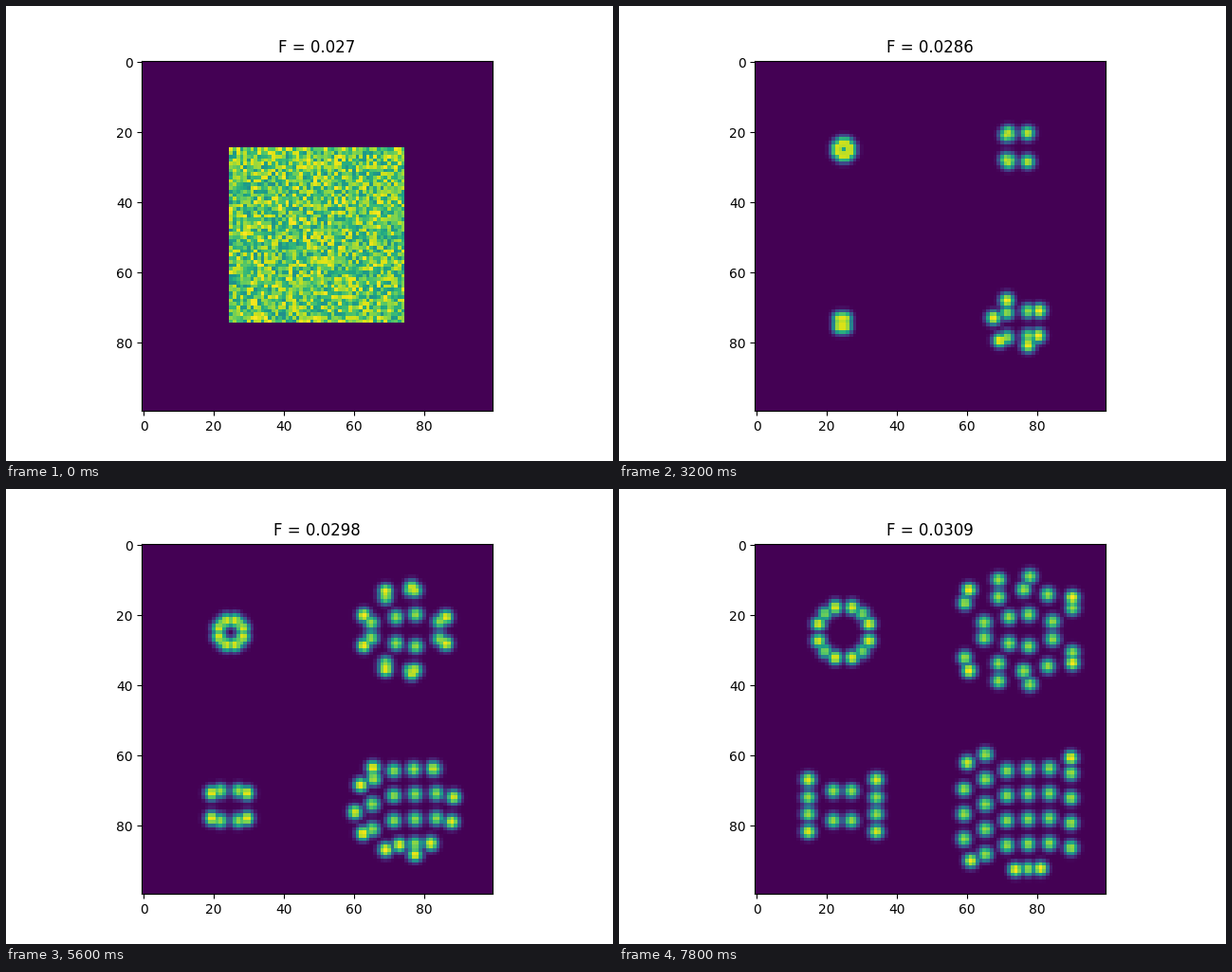
Recreate the animation shown at these times as a matplotlib script. Size 640 by 480 pixels, loop 8 s.

```python
import numpy as np
import matplotlib.pyplot as plt
from matplotlib.animation import FuncAnimation

SIZE = 100
FRAMES = 40
rows, cols = np.mgrid[0:SIZE, 0:SIZE]


def mirror(points, sx=(1,), sy=(1,)):
    return [(a * x, b * y) for x, y in points for a in sx for b in sy]


class Colony:
    """Spots that divide outward from a centre, each one leaving its
    nearest inner neighbour when the growth front gets there."""

    def __init__(self, centre, sites, start, speed):
        self.centre, self.start, self.speed = np.array(centre), start, speed
        sites = np.array([(0, 0)] + sites, float)
        radius = np.hypot(*sites.T)
        order = radius.argsort(kind="stable")
        self.sites, self.radius = sites[order], radius[order]
        self.parent = [self.find_parent(n) for n in range(1, len(sites))]

    def find_parent(self, n):
        gap = np.hypot(*(self.sites - self.sites[n]).T)
        gap[self.radius > self.radius[n] - 1e-6] = np.inf
        return gap.argmin()

    def spots(self, i):
        front = max(1.3, self.speed * (i - self.start))
        places = [np.zeros(2)]
        for n, m in enumerate(self.parent, 1):
            span = max(self.radius[n] - self.radius[m], 4)
            p = np.clip((front - self.radius[m]) / span, 0, 1)
            place = places[m] + p * (self.sites[n] - places[m])
            places.append(place)
            # spots on the move glow a little brighter
            yield *(self.centre + place), 0.85 + 0.15 * np.sin(np.pi * p)


class Ring:
    """A round spot that opens into a ring of four arcs."""

    def __init__(self, centre, start, speed):
        self.centre, self.start, self.speed = centre, start, speed

    def spots(self, i):
        r = max(1.7, self.speed * (i - self.start))
        for corner in range(45, 360, 90):
            for turn in (-26.5, 0, 26.5):
                a = np.radians(corner + turn)
                glow = 0.95 if turn else 0.8
                yield (self.centre[0] + r * np.cos(a),
                       self.centre[1] + r * np.sin(a), glow)


BOTH = (1, -1)
NE = [(-2.4, 3.7), (3.2, 4.5), (-9.5, 2.2), (10, 2.5), (-5.4, 9.5),
      (1.8, 11.6), (8.7, 10.2), (-15, 7.8), (15.7, 6.4), (-12.9, 14.2),
      (-5.4, 14.4), (3.5, 15.4), (15.7, 11.6)]
SW = [(2.6, 4.2), (9.7, 2.4), (9.7, 8.9)]
# staggered columns, given by the height of their top spot
TOPS = (-11.8, -14.6, -10, -10.4, -10.6, -16.4)
SE = [(6.1 * (c - 2.5), top + 7.1 * j)
      for c, top in enumerate(TOPS) for j in range(5)]

COLONIES = [
    Ring((24.9, 25), 18, 0.36),
    Colony((74.4, 24.4), mirror(NE, sy=BOTH), 8, 0.62),
    Colony((24.5, 74.4), mirror(SW, BOTH, BOTH), 16.5, 0.58),
    Colony((74.4, 74.4), SE, 3.5, 0.58),
]


def field(i):
    grid = np.zeros((SIZE, SIZE))
    if i == 0:
        grid[25:75, 25:75] = np.random.default_rng(4).uniform(0.5, 1, (50, 50))
        return grid
    for colony in COLONIES:
        for x, y, glow in colony.spots(i):
            dist = np.hypot(cols - x, rows - y)
            grid = np.maximum(grid, glow * np.exp(-(dist / 2.1) ** 2.6))
    return grid / grid.max()


fig, ax = plt.subplots(figsize=(6.4, 4.8), dpi=100)
image = ax.imshow(field(0), cmap="viridis", vmin=0, vmax=1,
                  interpolation="nearest")
title = ax.set_title("F = 0.027")


def update(i):
    image.set_data(field(i))
    title.set_text(f"F = {0.027 + 0.0001 * i:.4g}")
    return image, title


anim = FuncAnimation(fig, update, frames=FRAMES, interval=200, repeat=True,
                     repeat_delay=0, blit=False)
plt.show()
```
